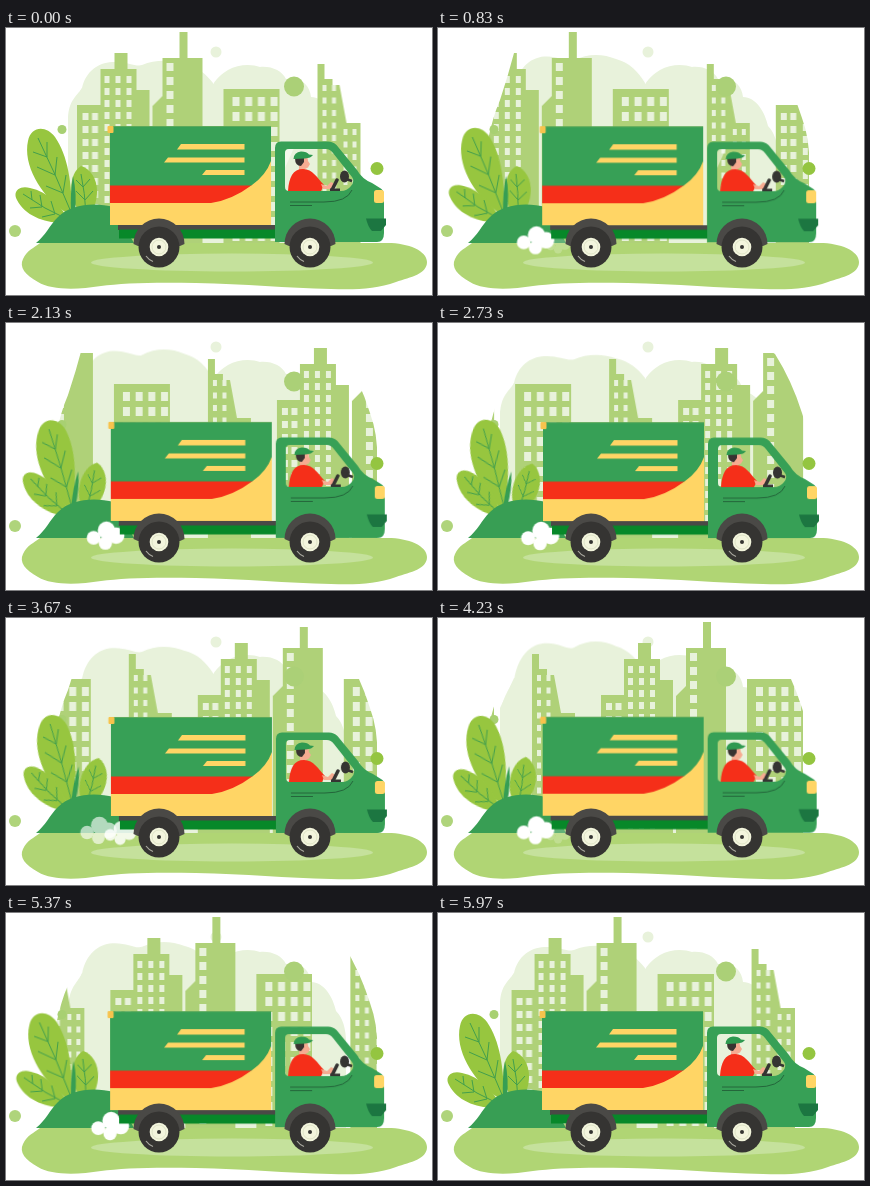
Recreate the animation shown at these times as an HTML page. Size 426 px wide and 267 px high, loop 6010 ms.

```html
<!DOCTYPE html>
<html lang="en">
<head>
<meta charset="utf-8">
<title>Delivery truck</title>
<style>
html, body { margin: 0; width: 100%; height: 100%; overflow: hidden; background: #fff; }
svg { display: block; width: 100vw; height: 100vh; }
:root { --loop: 6010ms; --soft: cubic-bezier(.37, 0, .63, 1); }

.city { animation: scroll var(--loop) linear infinite; }
@keyframes scroll { from { transform: translateX(-.5px); } to { transform: translateX(-309.5px); } }

.swell { transform-origin: 0 55px; animation: swell calc(var(--loop) / 4) var(--soft) infinite alternate; }
@keyframes swell { to { transform: scaleY(1.45); } }

.sway { animation: sway calc(var(--loop) / 2) var(--soft) infinite alternate; }
@keyframes sway { from { transform: rotate(0deg); } to { transform: rotate(var(--turn)); } }

.drift { animation: drift calc(var(--loop) / 2) var(--soft) infinite alternate; }
@keyframes drift { to { transform: translate(1px, 1.1px); } }

.puff { opacity: 0; animation: puff var(--loop) linear infinite; }
@keyframes puff {
  0% { opacity: 0; transform: translate(122px, 217px) scale(.6); }
  2.7% { opacity: .85; transform: translate(114px, 215px) scale(.9); }
  5% { opacity: 1; transform: translate(109px, 213px) scale(1.05); }
  9.7% { opacity: 1; transform: translate(102px, 213px) scale(1.08); }
  13.2% { opacity: 1; transform: translate(95px, 212px) scale(1.05); }
  15.3%, 100% { opacity: 0; transform: translate(88px, 213px) scale(1); }
}

.shine { animation: shine var(--loop) linear infinite; }
@keyframes shine {
  0%, 23% { transform: translateX(-26px); }
  36%, 100% { transform: translateX(76px); }
}
</style>
</head>
<body>
<svg viewBox="0 0 426 267" preserveAspectRatio="none">
  <defs>
    <clipPath id="skyline">
      <path d="M50 216V112Q55 88 62 72Q70 48 76 25L90 0H270L286 9H304L337 31Q354 58 364 90Q372 112 371 135V216Z"/>
    </clipPath>
    <clipPath id="panel">
      <path d="M104 98H265V133Q260 147 246 157Q226 172 205 175H104Z"/>
    </clipPath>
    <clipPath id="glass">
      <path d="M283 121H320Q324 121 327 125L346 149Q349 153 345 158Q341 163 335 163H283Q279 163 279 159V125Q279 121 283 121Z"/>
    </clipPath>

    <g id="block">
      <g fill="#afd178">
        <path d="M72 215V77H95V41H109V25H122V41H131V62H144V215Z"/>
        <path d="M147 215V78L157 68V30H174V4H182V30H197V215Z"/>
        <path d="M218 215V61H274V215Z"/>
        <path d="M312 215V36H319V51H327V57H334L341 95H355V215Z"/>
      </g>
      <g class="windows" fill="#e8f2db"></g>
    </g>

    <g id="wheel">
      <path d="M-25.500 -3A25.500 25.500 0 0 1 25.500 -3L21 -1H-21Z" fill="#4a4946"/>
      <circle r="20.5" fill="#353432"/>
      <path d="M-13 9A16 16 0 0 0 -6 14.5" fill="none" stroke="#a9a89f" stroke-width="1.2"/>
      <circle r="9.3" fill="#f3f5dd"/>
      <circle r="7" fill="none" stroke="#d9dfc0" stroke-width=".8"/>
      <circle r="2" fill="#353432"/>
    </g>

    <g id="cloud" fill="#fff">
      <circle cx="-11" cy="2" r="6.5"/>
      <circle cx="1" cy="-5" r="8.2"/>
      <circle cx="10" cy="0" r="7.8"/>
      <circle cx="0" cy="7" r="6.2"/>
    </g>
  </defs>

  <g fill="#e8f2db">
    <path class="swell" d="M62 90C63 72 70 69 76 60C80 43 92 35 106 34C120 33 130 39 136 37C150 31 166 32 178 36C192 39 200 46 207 55V90Z"/>
    <path d="M62 216V90L76 60H205C210 50 216 46 222 42C232 36 246 36 254 39C266 38 276 43 280 51C295 49 304 57 305 69C318 69 327 84 330 98Q340 108 340 130V216Z"/>
  </g>
  <circle cx="210" cy="24" r="5.5" fill="#e8f2db"/>

  <g clip-path="url(#skyline)">
    <g class="city">
      <use href="#block"/>
      <use href="#block" x="309"/>
    </g>
  </g>

  <circle cx="288" cy="58.5" r="10" fill="#abd077"/>
  <circle cx="371" cy="140.5" r="6.5" fill="#94c540"/>
  <circle cx="56" cy="101.5" r="4.5" fill="#a8d072"/>
  <circle cx="9" cy="203" r="6" fill="#afd47b"/>

  <path fill="#b0d574" d="M34 215H378C400 214 421 222 421 234C421 246 405 249 390 254C370 261 350 262 325 261C280 260 240 256 190 255C150 254 115 255 95 258C70 262 45 262 32 254C19 247 13 239 17 231C21 222 28 220 34 215Z"/>
  <ellipse cx="226" cy="234.5" rx="141" ry="9" fill="#c5e19c"/>

  <g class="plants" fill="#97c63f">
    <g class="sway" style="--turn:9.5deg;transform-origin:66px 190px">
      <path d="M66 188C40 175 16 140 22 113C25 98 40 97 49 109C62 128 66 155 66 188Z"/>
      <path class="vein" d="M65 184Q49 145 32 110M57 165L60 147M57 165L40 158M49 147L51 129M49 147L31 139M41 129L41 114M41 129L27 124"/>
    </g>
    <g class="sway" style="--turn:17deg;transform-origin:63px 192px">
      <path d="M64 194C45 197 20 190 11 172C6 163 14 157 24 160C42 164 54 176 64 194Z"/>
      <path class="vein" d="M63 192Q38 181 17 166M49 186L45 173M49 186L36 189M36 179L34 167M36 179L24 180M26 172L25 163"/>
    </g>
    <g class="sway" style="--turn:23deg;transform-origin:78px 188px">
      <path d="M78 188C61 174 62 146 75 138C89 142 98 163 84 188Z"/>
      <path class="vein" d="M80 186Q79 165 75 146M79 172L70 163M79 172L87 163M77 159L70 152M77 159L84 151"/>
    </g>
    <path class="sway" style="--turn:10deg;transform-origin:68px 185px" fill="#369e53" d="M65 185Q64 165 67 148Q71 165 69 185Z"/>
  </g>
  <path fill="#389e54" d="M30 215C40 207 43 198 52 189C65 176 88 174 108 179L128 215Z"/>

  <g class="puffs"></g>

  <g class="drift">
    <rect x="112" y="197" width="160" height="5" fill="#4a4946"/>
    <rect x="113" y="201.5" width="159" height="9" fill="#078829"/>
    <rect x="104" y="98.2" width="161" height="98.8" fill="#ffd565"/>
    <g clip-path="url(#panel)">
      <rect x="104" y="98.2" width="161" height="60" fill="#37a056"/>
      <rect x="104" y="157.5" width="161" height="18" fill="#f52f19"/>
    </g>
    <path fill="#ffd565" d="M175 116H238.500V121.500H171ZM162 129.500H238.500V134.500H158ZM200 142H238.500V147H196Z"/>
    <rect x="101.500" y="98" width="6" height="7" rx="1" fill="#f7c34d"/>

    <!-- The side window is a real opening: the city shows through it. -->
    <path fill="#37a056" fill-rule="evenodd" d="M275 113.500H322Q327 113.500 330.500 117L351 142Q356 151 366 155L374 160Q378 162 378 168V205Q378 214 371 214H269V120Q269 113.500 275 113.500Z M283 121H320Q324 121 327 125L346 149Q349 153 345 158Q341 163 335 163H283Q279 163 279 159V125Q279 121 283 121Z"/>
    <path fill="#1c7641" d="M360 190.500H380V197L375 203H366Q362 199 360 190.500Z"/>
    <rect x="368" y="162" width="10" height="13" rx="2.500" fill="#ffd565"/>
    <path d="M284 174H318Q341 174 346 162M284 177.500H306" fill="none" stroke="#24663b" stroke-width="1"/>

    <g clip-path="url(#glass)">
      <path fill="#f6ab91" d="M296 129H301.500L302 133L304 136L302 139.500L299 141V146H293V133Z"/>
      <path fill="#393331" d="M289 130H298V134L295 138Q289 138 289 130Z"/>
      <path fill="#2e9950" d="M287.500 131Q288 124 295 123.500Q301 123.500 303 126.500L307 127Q305 130 299 130.500Z"/>
      <path fill="#f52f19" d="M282 163C283 149 287 141 297 141C307 141 311 150 318 157L315 163Z"/>
      <path fill="#f6ab91" d="M315 156L321 158L325 154L329 156L325 161L317 161Z"/>
      <path d="M326 162L331 152" stroke="#353432" stroke-width="3.500" stroke-linecap="round"/>
      <path d="M324 162H334" stroke="#353432" stroke-width="3"/>
      <path class="shine" fill="#fff" opacity=".5" d="M280 164L300 120H314L294 164Z"/>
    </g>
    <ellipse cx="338.500" cy="148.500" rx="4.500" ry="6" fill="#353432"/>
    <path d="M340 151L346 153" stroke="#353432" stroke-width="2.500"/>
  </g>

  <use href="#wheel" x="153" y="219"/>
  <use href="#wheel" x="304" y="219"/>
</svg>

<script>
const NS = 'http://www.w3.org/2000/svg';

function add(parent, tag, attrs) {
  const node = document.createElementNS(NS, tag);
  for (const key in attrs) node.setAttribute(key, attrs[key]);
  parent.appendChild(node);
  return node;
}

// One grid of windows: origin, columns, column pitch, row pitch, window size.
function grid(x, y, cols, dx, dy, w, h) {
  const panes = document.querySelector('.windows');
  for (let row = y; row < 205; row += dy)
    for (let c = 0; c < cols; c++)
      add(panes, 'rect', { x: x + c * dx, y: row, width: w, height: h });
}

grid(77, 85, 2, 9.5, 13, 6, 7);
grid(99, 48, 3, 11, 12, 5, 7);
grid(161, 35, 1, 0, 14, 7, 8);
grid(227, 69, 4, 12.7, 15, 7, 9);
grid(317, 57, 2, 9.5, 12.5, 4, 6);
grid(338, 101, 2, 9, 12.5, 4, 6);

for (const vein of document.querySelectorAll('.vein')) {
  vein.setAttribute('fill', 'none');
  vein.setAttribute('stroke', '#429f4d');
  vein.setAttribute('stroke-width', '1');
}

// Exhaust leaves the pipe at a steady beat and pauses before the loop ends.
const puffs = document.querySelector('.puffs');
for (let i = 0; i < 8; i++) {
  const puff = add(puffs, 'g', { class: 'puff' });
  puff.style.animationDelay = 110 + i * 680 + 'ms';
  add(puff, 'use', { href: '#cloud' });
}
</script>
</body>
</html>
```
